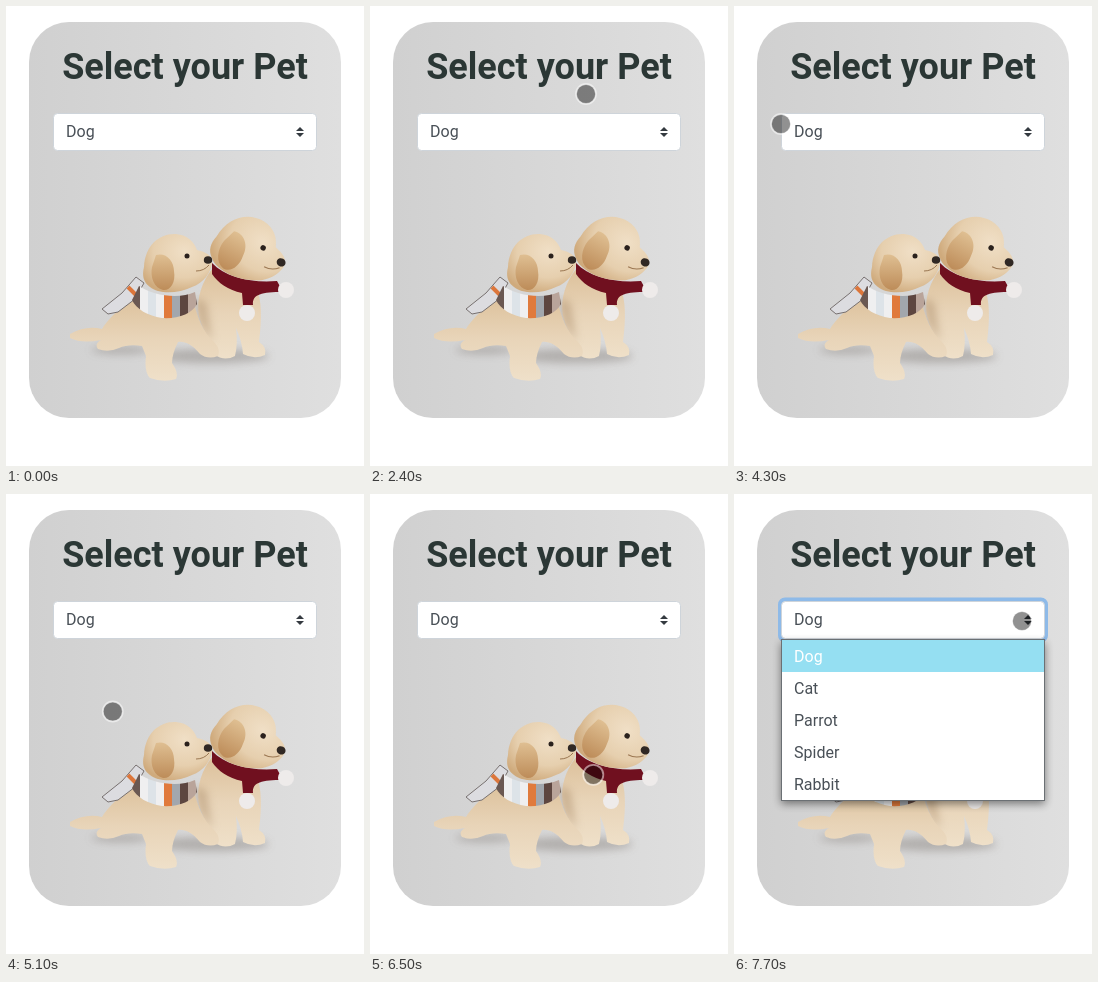
An HTML page for the animation above (8 s loop, 358 by 460 pixels).

```html
<!DOCTYPE html>
<html lang="en">
<head>
<meta charset="utf-8">
<title>Select your Pet</title>
<style>
  html, body { margin: 0; width: 100%; height: 100%; overflow: hidden; background: #fff; }
  svg { display: block; width: 100%; height: 100%; }
  text { font: 16px Roboto, sans-serif; fill: #495057; }
  .title { font-size: 36px; font-weight: 700; fill: #2b3735; text-anchor: middle; }
</style>
</head>
<body>
<svg viewBox="0 0 358 460">
  <defs>
    <linearGradient id="card"><stop stop-color="#d0d0d0"/><stop offset="1" stop-color="#dfdfdf"/></linearGradient>
    <linearGradient id="fur" x1="0" y1="0" x2="0" y2="1">
      <stop stop-color="#dcc09a"/><stop offset=".5" stop-color="#e8d4b8"/><stop offset="1" stop-color="#efe0c9"/>
    </linearGradient>
    <radialGradient id="face" cx=".6" cy=".3" r=".75">
      <stop stop-color="#f0dfc6"/><stop offset=".6" stop-color="#e6cfae"/><stop offset="1" stop-color="#cfaa7c"/>
    </radialGradient>
    <linearGradient id="ear" x1="0" y1="0" x2="0" y2="1">
      <stop stop-color="#dfbf92"/><stop offset="1" stop-color="#bd8c59"/>
    </linearGradient>
    <filter id="soft" x="-50%" y="-50%" width="200%" height="200%"><feGaussianBlur stdDeviation="4"/></filter>
    <filter id="edge"><feGaussianBlur stdDeviation=".5"/></filter>
    <pattern id="stripes" x="126" y="0" width="64" height="400" patternUnits="userSpaceOnUse"/>
    <g id="head">
      <path fill="url(#face)" d="M-34 4C-33 -18 -18 -30 -2 -29C10 -28 16 -21 19 -13C28 -11 34 -8 34 0C33 9 26 20 14 24C0 31 -20 31 -28 24C-35 19 -36 12 -34 4Z"/>
      <path fill="url(#ear)" d="M-22 -8C-12 -11 -4 -2 -4 8C-2 20 -8 28 -15 27C-24 25 -28 14 -26 4Z"/>
      <path fill="none" stroke="#9b7752" d="M18 8Q26 8 31 2"/>
      <circle cx="9" cy="-7" r="2.5" fill="#2a211d"/>
      <ellipse cx="30" cy="-3" rx="4.2" ry="3.8" fill="#302824"/>
    </g>
  </defs>

  <rect x="23" y="16" width="312" height="396" rx="40" fill="url(#card)"/>
  <text class="title" x="179" y="73">Select your Pet</text>

  <g filter="url(#edge)">
    <g fill="#77706a" opacity=".4" filter="url(#soft)">
      <ellipse cx="205" cy="350" rx="58" ry="7"/>
      <ellipse cx="115" cy="344" rx="30" ry="4"/>
    </g>

    <!-- right puppy -->
    <path fill="url(#fur)" d="M207 262C196 275 190 292 193 310C198 328 205 336 208 348Q218 356 229 350Q232 338 230 322Q236 335 237 348Q248 354 259 349Q261 341 253 336C256 312 256 295 250 280Z"/>
    <path fill="#70101f" d="M206 257C220 272 246 277 271 275L277 286C256 286 246 288 247 299L237 299L236 287C222 284 212 277 206 268Z"/>
    <use href="#head" transform="translate(245 244) rotate(28) scale(1.08)"/>
    <g fill="#eeebea"><circle cx="241" cy="307" r="8"/><circle cx="280" cy="284" r="8"/></g>

    <!-- left puppy -->
    <path fill="#a98a68" opacity=".5" filter="url(#soft)" d="M188 292L194 318L206 336L200 296Z"/>
    <path fill="url(#fur)" d="M64 328Q80 319 96 323C104 310 122 294 140 288L188 298C192 312 196 325 208 336Q215 343 212 350Q202 354 194 348C186 338 178 335 172 336Q166 348 166 357Q173 367 170 373Q158 377 144 372Q138 366 140 350L136 340Q122 338 113 342Q102 347 92 343Q88 338 95 334Q76 338 64 332Z"/>
    <path fill="#dcdce0" stroke="#77706f" d="M96 303L116 287L130 271L138 277L129 293L112 306L102 308Z"/>
    <path stroke="#dc763b" stroke-width="4" d="M122 281L131 290"/>
    <path fill="url(#stripes)" d="M133 280C146 289 172 294 189 286L191 298C186 308 172 313 156 312C142 310 130 303 126 294Z"/>
    <use href="#head" transform="translate(172 257)"/>
  </g>

  <rect id="ring" x="46" y="105.5" width="266" height="41" rx="5" fill="none" stroke="#8ebae8" stroke-width="4"/>
  <rect x="47.5" y="107.5" width="263" height="37" rx="4" fill="#fff" stroke="#ced4da"/>
  <text x="60" y="131">Dog</text>
  <path fill="#343a40" transform="translate(290 121) scale(2)" d="M2 0L0 2h4zm0 5L0 3h4z"/>

  <g id="list">
    <rect x="47" y="149" width="264" height="161" opacity=".45" filter="url(#soft)"/>
    <rect x="47.5" y="145.5" width="263" height="161" fill="#fff" stroke="#6b7074"/>
    <rect x="48" y="146" width="262" height="32" fill="#95dff2"/>
  </g>

  <g id="cursor">
    <circle r="9.5" fill="#000" fill-opacity=".43"/>
    <circle r="10" fill="none" stroke="#fff" stroke-opacity=".5" stroke-width="1.8"/>
  </g>
</svg>
<script>
const LOOP = 8000, STEP = 100;
const $ = id => document.getElementById(id);
const ring = $('ring'), list = $('list'), cursor = $('cursor');

function add(parent, tag, attrs) {
  const el = document.createElementNS('http://www.w3.org/2000/svg', tag);
  for (const key in attrs) el.setAttribute(key, attrs[key]);
  return parent.appendChild(el);
}

const wool = ['#6a5852', '#efeff0', '#dde3e8', '#efeff0', '#e07a3c', '#a2a7ad', '#5d4640', '#b9a49a'];
wool.forEach((fill, i) => add($('stripes'), 'rect', { x: 8 * i, width: 8, height: 400, fill }));

['Dog', 'Cat', 'Parrot', 'Spider', 'Rabbit'].forEach((name, i) => {
  const item = add(list, 'text', { x: 60, y: 168 + 32 * i });
  item.textContent = name;
  if (!i) item.style.fill = '#fff';
});

// Where the pointer rests: arrival time, then the points passed on the way
const stops = [
  [800, [88, -20]],
  [1200, [74, 83]],
  [1700, [46, 72], [61, 71]],
  [2400, [216, 88]],
  [3000, [244, 89], [184, 85]],
  [3500, [121, 81]],
  [4100, [50, 101]],
  [4300, [47, 118]],
  [4800, [88, 153]],
  [5700, [124, 290], [112, 354]],
  [6100, [221, 343]],
  [6800, [259, 310], [189, 250], [238, 204]],
  [7100, [285, 136]],
  [7300, [288, 127]]
];

// Catmull-Rom curve through the points, u from 0 to 1
function along(pts, u) {
  const n = pts.length - 1, i = Math.min(n - 1, Math.floor(u * n)), f = u * n - i;
  const [a, b, c, d] = [pts[Math.max(0, i - 1)], pts[i], pts[i + 1], pts[Math.min(n, i + 2)]];
  return [0, 1].map(k => b[k] + f / 2 * (c[k] - a[k] +
    f * (2 * a[k] - 5 * b[k] + 4 * c[k] - d[k] + f * (3 * (b[k] - c[k]) + d[k] - a[k]))));
}

// Each leg waits one step at its start, then moves evenly in steps
function pointer(t) {
  const next = stops.findIndex(([time]) => time > t);
  if (next < 0) return stops.at(-1).at(-1);
  if (!next) return stops[0][1];
  const [start, ...before] = stops[next - 1], [end, ...pts] = stops[next];
  const step = Math.floor((t - start) / STEP) - 1, steps = (end - start) / STEP - 1;
  return along([before.at(-1), ...pts], Math.max(0, step / steps));
}

// Fade in over two steps
const fade = (t, from) => Math.min(1, Math.max(0, Math.floor((t - from) / STEP) + 1) / 2);

function draw(t) {
  cursor.setAttribute('transform', `translate(${pointer(t)})`);
  ring.style.opacity = fade(t, 7500);
  list.style.opacity = fade(t, 7600);
}

const begin = performance.now();
function tick() {
  draw((performance.now() - begin) % LOOP);
  requestAnimationFrame(tick);
}
tick();
</script>
</body>
</html>
```
